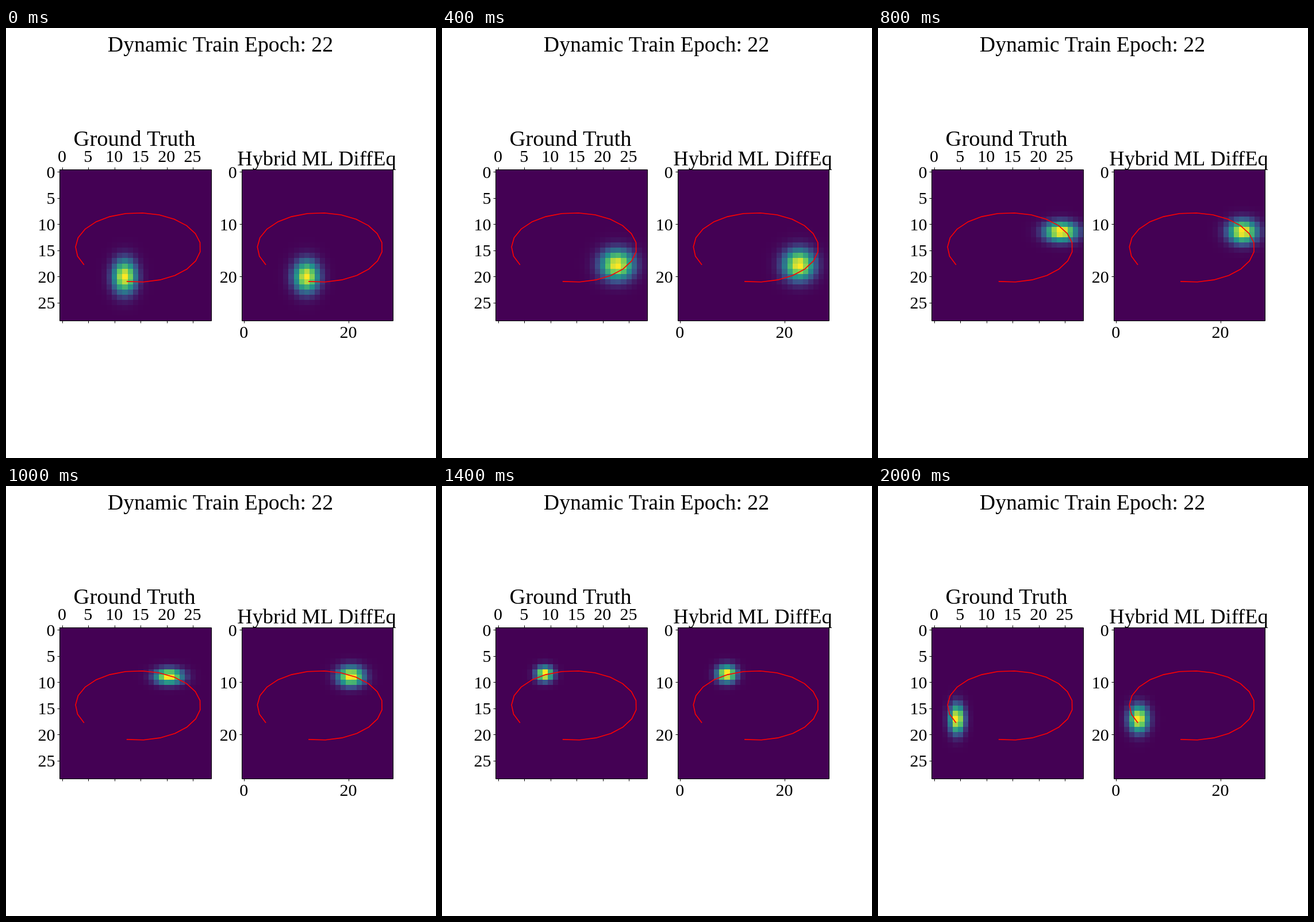
Recreate the animation shown at these times as an HTML page with a canvas. Size 748x748 px, loop 2.1 s.

```html
<!DOCTYPE html>
<html lang="en">
<head>
<meta charset="utf-8">
<title>Training epoch</title>
<style>
  html, body { margin: 0; width: 100%; height: 100%; overflow: hidden; background: #fff; }
  canvas { display: block; }
</style>
</head>
<body>
<canvas id="stage" width="748" height="748"></canvas>
<script>
const ctx = document.getElementById('stage').getContext('2d');
const N = 29, SIZE = 263.5, CELL = SIZE / N, TOP = 245.95;
const STEP = 100, STEPS = 21;
const RAD = Math.PI / 180;

// Spread in cells swings around a mean and is widest at the peak angle
const left = {
  x0: 93.4, xTicks: [0, 5, 10, 15, 20, 25], yTicks: [0, 5, 10, 15, 20, 25], labelsOnTop: true,
  spreadX: { mean: 1.55, swing: 0.7, peak: 10 },
  spreadY: { mean: 1.55, swing: 0.65, peak: 90 }
};
const right = {
  x0: 409.7, xTicks: [0, 20], yTicks: [0, 10, 20], labelsOnTop: false,
  spreadX: { mean: 1.6, swing: 0.45, peak: 20 },
  spreadY: { mean: 1.6, swing: 0.5, peak: 75 }
};

const viridis = [[68, 1, 84], [59, 82, 139], [33, 145, 140], [94, 201, 98], [253, 231, 37]];

function color(v) {
  const p = v * (viridis.length - 1);
  const i = Math.min(Math.floor(p), viridis.length - 2);
  return `rgb(${viridis[i].map((a, k) => Math.round(a + (viridis[i + 1][k] - a) * (p - i)))})`;
}

// Orbit: an ellipse walked at constant angular speed, relative to the panel
const angle = step => 100.6 - 15.54 * step;
const orbit = step => [
  136.4 + 108.8 * Math.cos(angle(step) * RAD),
  135.8 + 60.2 * Math.sin(angle(step) * RAD)
];

// The blob follows the line on a slightly smaller scale
const toCell = px => 0.935 * (px / CELL - 0.5) + 0.4;

function bell(center, { mean, swing, peak }, step) {
  const sigma = mean + swing * Math.cos((angle(step) - peak) * RAD);
  const g = Array.from({ length: N }, (_, i) => Math.exp(-0.5 * ((i - center) / sigma) ** 2));
  const max = Math.max(...g);
  return g.map(v => v / max);
}

function drawHeat({ x0, spreadX, spreadY }, step) {
  const [cx, cy] = orbit(step).map(toCell);
  const gx = bell(cx, spreadX, step), gy = bell(cy, spreadY, step);
  const edge = (origin, i) => Math.round(origin + i * CELL);
  for (let r = 0; r < N; r++) {
    for (let c = 0; c < N; c++) {
      const x = edge(x0, c), y = edge(TOP, r);
      ctx.fillStyle = color(gx[c] * gy[r]);
      ctx.fillRect(x, y, edge(x0, c + 1) - x, edge(TOP, r + 1) - y);
    }
  }
}

function drawOrbit(x0) {
  ctx.beginPath();
  for (let i = 0; i < STEPS; i++) {
    const [x, y] = orbit(i);
    ctx.lineTo(x0 + x, TOP + y);
  }
  ctx.strokeStyle = '#f00';
  ctx.lineWidth = 1.6;
  ctx.lineJoin = 'round';
  ctx.stroke();
}

function text(str, x, y, size, align = 'center') {
  ctx.font = `${size}px "Liberation Serif", "Times New Roman", serif`;
  ctx.textAlign = align;
  ctx.fillStyle = '#000';
  ctx.fillText(str, x, y);
}

function line(x, y, dx, dy) {
  ctx.beginPath();
  ctx.moveTo(x, y);
  ctx.lineTo(x + dx, y + dy);
  ctx.stroke();
}

function drawAxes({ x0, xTicks, yTicks, labelsOnTop }) {
  const snap = v => Math.round(v) + 0.5;
  const at = v => (v + 0.5) * CELL;
  const x1 = snap(x0), x2 = snap(x0 + SIZE), y1 = snap(TOP), y2 = snap(TOP + SIZE);
  ctx.strokeStyle = '#000';
  ctx.lineWidth = 1;
  ctx.strokeRect(x1, y1, x2 - x1, y2 - y1);
  for (const v of xTicks) {
    const x = x0 + at(v);
    line(snap(x), y2, 0, 4);
    if (labelsOnTop) line(snap(x), y1, 0, -4);
    text(v, x - 0.5, labelsOnTop ? 233 : 539, 30);
  }
  for (const v of yTicks) {
    const y = TOP + at(v);
    line(x1, snap(y), -4, 0);
    text(v, x0 - 8, y + 10.5, 30, 'right');
  }
}

function draw(step) {
  ctx.fillStyle = '#fff';
  ctx.fillRect(0, 0, 748, 748);
  for (const panel of [left, right]) {
    drawHeat(panel, step);
    drawOrbit(panel.x0);
    drawAxes(panel);
  }
  text('Dynamic Train Epoch: 22', 373, 40.5, 37.8);
  text('Ground Truth', 223.5, 204.5, 38.6);
  text('Hybrid ML DiffEq', 540.5, 239, 36.4);
}

const start = performance.now();
function loop() {
  draw(Math.floor((performance.now() - start) / STEP) % STEPS);
  requestAnimationFrame(loop);
}
loop();
</script>
</body>
</html>
```
